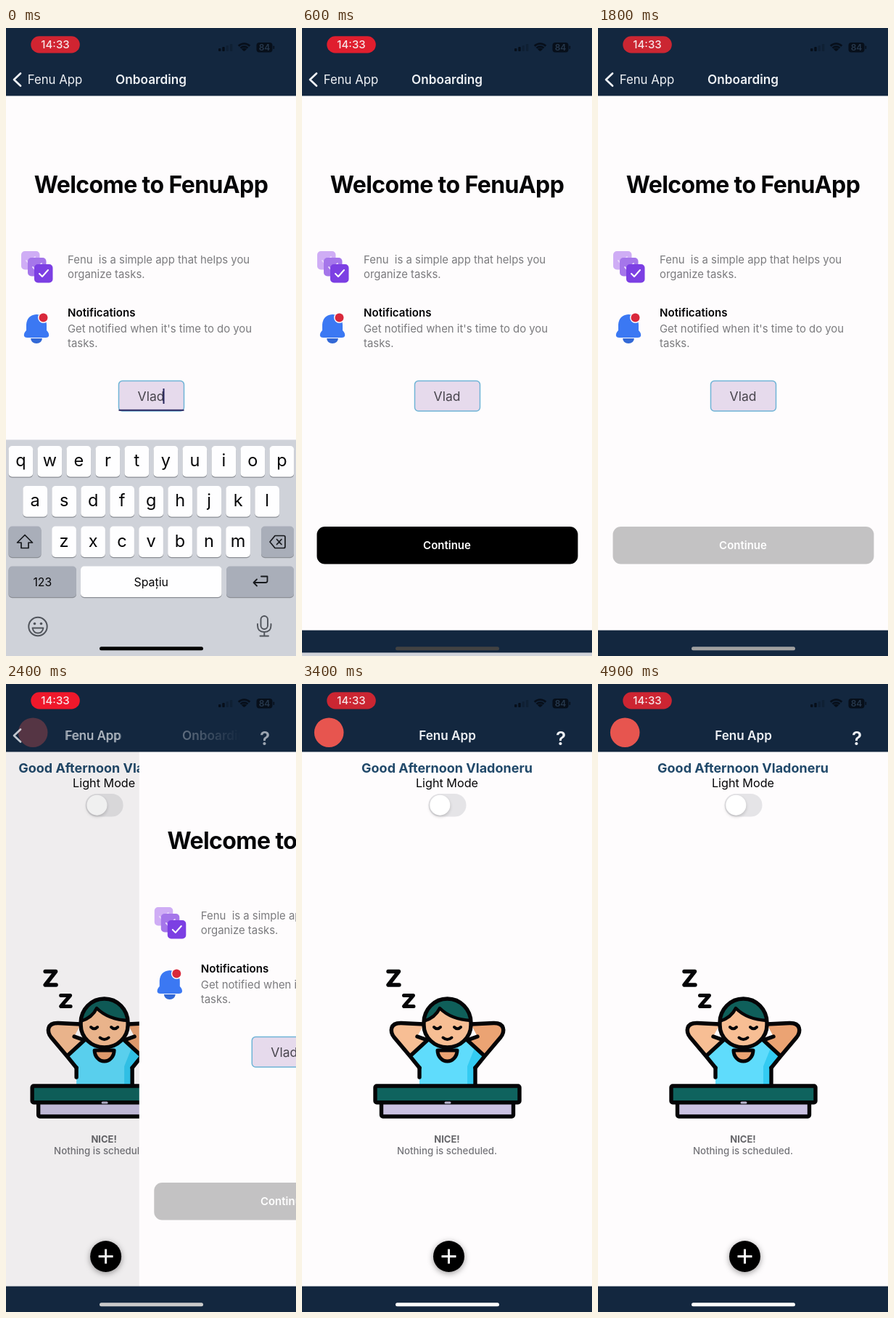
Animation, 400 px wide and 864 px high, one loop 5000 ms. Source, as an HTML page with a canvas:

```html
<!DOCTYPE html>
<html lang="en">
<head>
<meta charset="utf-8">
<title>Onboarding</title>
<style>
html, body { margin: 0; width: 100%; height: 100%; overflow: hidden; background: #13273f; }
canvas { display: block; width: 400px; height: 864px; }
</style>
</head>
<body>
<canvas id="stage" width="400" height="864"></canvas>
<script>
const ctx = document.getElementById('stage').getContext('2d');
const LOOP = 5000, STEP = 100;
const NAVY = '#13273f', PAPER = '#fefcfd', INK = '#050507', SKIN = '#f7be94', TAN = '#eba373';
const HIDE_AT = 271, PRESS_AT = 1650, POP_AT = 2315;
const HEAD_END = 93.4, FOOT = 828.6;

const clamp = v => Math.min(1, Math.max(0, v));
const lerp = (a, b, k) => a + (b - a) * k;

// Critically damped spring, as in the system transitions
function spring(ms) {
  const x = Math.max(0, ms) * 0.01826;
  return 1 - (1 + x) * Math.exp(-x);
}

function text(str, x, y, size, weight, color, align = 'left', spacing = 0) {
  ctx.font = `${weight} ${size}px Inter, "Open Sans", sans-serif`;
  ctx.letterSpacing = spacing + 'px';
  ctx.textAlign = align;
  ctx.fillStyle = color;
  ctx.fillText(str, x, y);
}

function box(x, y, w, h, r, fill, stroke, width) {
  ctx.beginPath();
  ctx.roundRect(x, y, w, h, r);
  paint(fill, stroke, width);
}

function disc(x, y, r, fill, stroke, width) {
  ctx.beginPath();
  ctx.arc(x, y, r, 0, Math.PI * 2);
  paint(fill, stroke, width);
}

function shape(d, fill, stroke, width) {
  paint(fill, stroke, width, new Path2D(d));
}

function paint(fill, stroke, width, path) {
  const args = path ? [path] : [];
  if (fill) { ctx.fillStyle = fill; ctx.fill(...args); }
  if (stroke) { ctx.strokeStyle = stroke; ctx.lineWidth = width; ctx.stroke(...args); }
}

// Runs a drawing shifted and faded
function layer(x, y, alpha, draw) {
  ctx.save();
  ctx.translate(x, y);
  ctx.globalAlpha = alpha;
  draw();
  ctx.restore();
}

function taskIcon() {
  ['#cfadf5', '#a576ea', '#7c3fe3'].forEach((c, i) => {
    const x = 21 + i * 9, y = 307 + i * 9;
    box(x, y, 25.5, 25.5, 5, c);
    shape(`M${x + 7} ${y + 13}l4 4 8-9`, null, i < 2 ? '#e6d5fa' : '#fff', 2);
  });
}

function bellIcon() {
  shape('M25 424Q24 420 28 416V408Q29 395 42 394Q55 395 56 408V416Q60 420 59 424Q58 426 55 426H29Q26 426 25 424Z', '#3b78f3');
  shape('M34 427H50Q49 434 42 434Q35 434 34 427Z', '#3268d6');
  disc(51.5, 398.5, 7.5, PAPER);
  disc(51.5, 398.5, 6, '#d9283b');
}

function onboarding(t) {
  ctx.fillStyle = PAPER;
  ctx.fillRect(0, 90, 400, 740);
  text('Welcome to FenuApp', 200, 227, 32, 700, INK, 'center', -0.6);

  taskIcon();
  bellIcon();
  const gray = '#7b7b7e';
  text('Fenu  is a simple app that helps you', 85, 324, 14.9, 400, gray);
  text('organize tasks.', 85, 344, 14.9, 400, gray);
  text('Notifications', 85, 397, 15.1, 600, INK);
  text("Get notified when it's time to do you", 85, 418.5, 14.9, 400, gray);
  text('tasks.', 85, 439, 14.9, 400, gray);

  box(155.5, 485.5, 90, 41.5, 5, '#e6daec', '#6fb4d6', 1.5);
  text('Vlad', 200, 513, 17.5, 400, '#47444c', 'center');
  const focus = 1 - clamp((t - HIDE_AT) / 150);
  if (focus > 0) {
    ctx.fillStyle = '#2d2a63';
    ctx.fillRect(200.5 - 45 * focus, 524.8, 90 * focus, 2);
  }
  if (t < HIDE_AT) {
    ctx.fillStyle = '#26245c';
    ctx.fillRect(216.5, 496, 2, 21);
  }

  const press = clamp((t - PRESS_AT) / 150);
  layer(0, 0, lerp(1, 0.23, press), () => box(20.5, 686, 360, 51.5, 11, '#000'));
  text('Continue', 200, 717, 15, 600, '#fff', 'center');
}

// Left arm with sleeve; the right one is its mirror image
function arm(skin) {
  shape('M168 468L137 466.5C121 466 121 478 127 486L149 512L173 490L159 485Z', skin);
  shape('M168 468L137 466.5C121 466 121 478 127 486L149 512L162 528M149 512L173 490L159 485', null, INK, 5.4);
}

function sleeper() {
  ctx.lineCap = ctx.lineJoin = 'round';
  shape('M119 395.5H133.5L119 414H134', null, INK, 5.4);
  shape('M140.5 428.5H153.5L140.5 443.5H154', null, INK, 5);

  shape('M173 490L149 512L162 528V553H239V528L252 512L228 490Z', '#5fdcfc');
  shape('M238 501L252 512L239 528V553H228V526Z', '#33cbf2');
  arm(SKIN);
  shape('M162 528V541M239 528V551', null, INK, 5.4);
  ctx.save();
  ctx.translate(401, 0);
  ctx.scale(-1, 1);
  arm(TAN);
  ctx.restore();

  // Neck and head
  shape('M187 504a13.5 15 0 0 0 27 0Z', TAN, INK, 5);
  const head = 'M168 466a32.5 33 0 0 1 65 0v3a32.5 31 0 0 1-65 0Z';
  shape(head, SKIN);
  ctx.save();
  ctx.clip(new Path2D(head));
  shape('M160 466Q184 459 190 446Q206 462 240 463V420H160Z', '#0f5f5a');
  shape('M168 464Q184 459 190 446Q206 462 234 463', null, INK, 4.4);
  ctx.restore();
  shape(head, null, INK, 5.4);
  shape('M182 472Q186.5 476.5 191 472M210 472Q214.5 476.5 219 472M194.5 486.5Q200.5 491.5 206.5 486.5', null, INK, 4);

  // Desk
  box(109.5, 575, 182, 20, 2, '#cac2e2', INK, 5.4);
  box(101, 553, 199, 22.8, 2, '#0f635e', INK, 5.4);
  shape('M198 576H204', null, '#b9b5cf', 3);
}

function home(p) {
  ctx.fillStyle = PAPER;
  ctx.fillRect(0, 90, 520, 740);
  text('Good Afternoon Vladoneru', 200, 121.5, 18, 700, '#21496a', 'center');
  text('Light Mode', 200, 142, 16.2, 400, INK, 'center');
  box(174.5, 151, 52, 31.5, 16, '#e5e4e7');
  layer(0, 0, 1, () => {
    ctx.shadowColor = 'rgba(0,0,0,.18)';
    ctx.shadowBlur = 4;
    ctx.shadowOffsetY = 2;
    disc(190.3, 166.7, 14, '#fff');
  });
  sleeper();
  text('NICE!', 200, 631, 13, 700, '#66666a', 'center');
  text('Nothing is scheduled.', 200, 647, 13.3, 500, '#75757a', 'center');
  layer(0, 0, 1, () => {
    ctx.shadowColor = 'rgba(0,0,0,.4)';
    ctx.shadowBlur = 8;
    ctx.shadowOffsetY = 2;
    disc(202.5, 787.5, 21.5, '#000');
  });
  ctx.lineCap = 'butt';
  shape('M192.5 787.5h20M202.5 777.5v20', null, '#fff', 3);
  if (p < 1) {
    ctx.fillStyle = `rgba(0,0,0,${0.11 * (1 - p)})`;
    ctx.fillRect(0, 90, 520, 740);
  }
}

function statusBar(t) {
  const glow = 0.5 + 0.5 * Math.cos((t - 2600) / 1600 * Math.PI * 2);
  const mix = (a, b) => Math.round(lerp(a, b, glow));
  box(34.3, 11.3, 67.5, 23.2, 11.6, `rgb(${mix(203, 245)},${mix(38, 22)},${mix(50, 42)})`);
  text('14:33', 68, 28.3, 15, 500, '#f6e6e8', 'center');

  const dark = '#070f1a';
  [4, 6, 8, 10].forEach((h, i) => {
    layer(0, 0, i < 2 ? 1 : 0.3, () => box(293 + i * 5.3, 32 - h, 3.4, h, 1, dark));
  });
  ctx.lineCap = 'butt';
  [3, 7, 11].forEach(r => {
    ctx.beginPath();
    ctx.arc(328.5, 32.5, r, -Math.PI * 0.75, -Math.PI * 0.25);
    paint(null, dark, r > 3 ? 2.6 : 4);
  });
  box(345.5, 20, 22, 13.5, 4, dark);
  box(368.5, 24.5, 1.6, 4.5, 1, dark);
  text('84', 356.5, 31.2, 12, 600, '#26384d', 'center');
}

function header(t, p) {
  ctx.fillStyle = NAVY;
  ctx.fillRect(0, 0, 400, HEAD_END);
  statusBar(t);

  const light = '#eef1f5';
  const slide = 1 - Math.pow(1 - Math.pow(p, 1.5), 1.35);
  const x = lerp(67.5, 200.5, slide);
  ctx.lineCap = ctx.lineJoin = 'round';
  layer(0, 0, Math.pow(p, 1.5), () => disc(37.2, 66.7, 20.3, '#e7554f'));
  layer(0, 0, 1 - p * p, () => shape('M20 62.5L11 71L20 79.5', null, light, 2.7));
  layer(0, 0, 1 - p, () => text('Fenu App', x, 77, 16.8, 400, light, 'center'));
  layer(0, 0, p, () => text('Fenu App', x, 77, 17.1, 600, light, 'center'));
  layer(0, 0, Math.pow(p, 0.6), () => text('?', 357, 84, 26, 600, light, 'center'));

  if (p < 0.99) {
    let color = light;
    if (p > 0) {
      color = ctx.createLinearGradient(200, 0, 324, 0);
      color.addColorStop(0, 'rgba(238,241,245,1)');
      color.addColorStop(1, 'rgba(238,241,245,0)');
    }
    layer(0, 0, 1 - p, () => {
      text('Onboarding', 200 + 200 * p, 77, 17.2, 600, color, 'center');
    });
  }
}

function key(x, y, w, label, size = 23.5, fill = '#fefeff') {
  box(x, y + 1.3, w, 42.5, 5, '#8b8e95');
  box(x, y, w, 42.5, 5, fill);
  if (label) text(label, x + w / 2, y + (size > 20 ? 28 : 27), size, 400, INK, 'center');
}

function keyboard() {
  const gray = '#a9aeb9', line = '#17191d';
  ctx.fillStyle = '#cfd2d9';
  ctx.fillRect(0, 566.5, 400, 298);
  [['qwertyuiop', 3.5, 575], ['asdfghjkl', 23.3, 630], ['zxcvbnm', 63.2, 685.5]].forEach(([row, x, y]) => {
    [...row].forEach((c, i) => key(x + i * 40, y, 33.7, c));
  });
  key(3.5, 685.5, 45, '', 0, gray);
  key(352, 685.5, 45, '', 0, gray);
  key(3.5, 740.5, 93.5, '123', 15.7, gray);
  key(103, 740.5, 194.5, 'Spațiu', 15.9);
  key(304, 740.5, 93, '', 0, gray);

  ctx.lineCap = ctx.lineJoin = 'round';
  shape('M26 697.5L15.5 708H21V715.5H31V708H36.5Z', null, line, 1.7);
  shape('M364 707L371 698.5H383Q385 698.5 385 700.5V713.5Q385 715.5 383 715.5H371ZM373.5 703.5L380 710.5M380 703.5L373.5 710.5', null, line, 1.7);
  shape('M342 763H358Q360.5 763 360.5 760.5V754.5H352M346 758.5L341.5 763L346 767.5', null, line, 1.8);

  const tool = '#50545b';
  disc(44, 823.5, 12.7, null, tool, 2);
  disc(39.5, 819.5, 1.8, tool);
  disc(48.5, 819.5, 1.8, tool);
  shape('M36.5 825.5H51.5Q50 832.5 44 832.5Q38 832.5 36.5 825.5Z', null, tool, 1.8);
  box(351.5, 809, 9.5, 18, 5, null, tool, 1.9);
  shape('M347 820V822Q347 831 356.3 831Q365.5 831 365.5 822V820M356.3 831V836.5M350.5 836.5H362', null, tool, 1.9);
}

function homeBar(t) {
  const stops = [[HIDE_AT, 5], [600, 66], [1100, 150], [1800, 160], [2400, 202], [3400, 252]];
  let level = stops[0][1];
  for (let i = 1; i < stops.length; i++) {
    const [t0, a] = stops[i - 1], [t1, b] = stops[i];
    if (t > t0) level = lerp(a, b, clamp((t - t0) / (t1 - t0)));
  }
  box(129, 851.2, 143, 5, 2.5, `rgb(${level},${level},${level})`);
}

function draw(t) {
  const p = spring(t - POP_AT);
  const hide = spring(t - HIDE_AT);
  ctx.clearRect(0, 0, 400, 864);
  if (p > 0) layer(-120 * (1 - p), 0, 1, () => home(p));
  if (p < 0.999) layer(400 * p, 0, 1, () => onboarding(t));
  header(t, p);
  ctx.fillStyle = NAVY;
  ctx.fillRect(0, FOOT, 400, 864 - FOOT);
  if (hide < 0.998) layer(0, 298 * hide, 1, keyboard);
  homeBar(t);
}

function tick() {
  const t = performance.now() % LOOP;
  draw(Math.floor(t / STEP) * STEP);
  requestAnimationFrame(tick);
}
tick();
</script>
</body>
</html>
```
